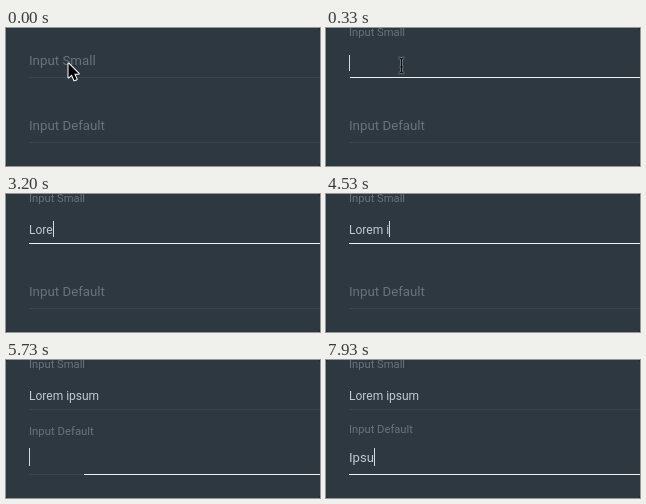
These frames come from a looping animation (314 px wide and 138 px high, 8000 ms). An HTML page with a canvas:

```html
<!DOCTYPE html>
<html lang="en">
<head>
<meta charset="utf-8">
<title>Floating label inputs</title>
<style>
html, body { margin: 0; width: 100%; height: 100%; overflow: hidden; background: #1d262b; }
canvas { display: block; border-radius: 3px; }
</style>
</head>
<body>
<canvas id="stage" width="314" height="138"></canvas>
<script>
const ctx = document.getElementById('stage').getContext('2d');
const LOOP = 8000, LEFT = 23, RIGHT = 314;
const LINE_CENTER = 794; // the fields run far past the right edge
const FLOAT_MS = 250;
const COLOR = { bg: '#2d3840', label: '#69737a', text: '#c3c9cd', idle: '#3a454c', active: '#eef1f2', caret: '#d5dadd' };

const fields = [
  {
    label: 'Input Small', labelY: 37, lineY: 49, size: 12, textY: 40, caretY: 27, caretH: 16,
    focus: 90, blur: 5560, value: 'Lorem ipsum',
    keys: [2330, 2670, 3000, 3200, 3800, 3930, 4530, 4730, 4930, 5070, 5200],
    blinks: [130, 800, 1330, 1800, 2270, 3730, 3800, 4470, 4530, 5600]
  },
  {
    label: 'Input Default', labelY: 102, lineY: 114, size: 13.1, textY: 102, caretY: 88, caretH: 18,
    focus: 5560, blur: Infinity, value: 'Ipsu',
    keys: [7330, 7530, 7800, 7930],
    blinks: [5600, 6330, 6800]
  }
];

const lerp = (a, b, p) => a + (b - a) * p;
const countPast = (times, t) => times.filter(x => x <= t).length;

// cubic-bezier(.4, 0, .2, 1), solved by bisection
function ease(x) {
  if (x <= 0) return 0;
  if (x >= 1) return 1;
  let lo = 0, hi = 1;
  for (let i = 0; i < 24; i++) {
    const u = (lo + hi) / 2, v = 1 - u;
    if (1.2 * v * v * u + 0.6 * v * u * u + u * u * u < x) lo = u; else hi = u;
  }
  return lo * lo * (3 - 2 * lo);
}

// Motion advances at 15 steps per second.
function snap(t) {
  const rest = t % 200;
  return t - rest + (rest >= 130 ? 130 : rest >= 70 ? 70 : 0);
}

function text(str, x, y, size, color) {
  ctx.font = `${size}px Roboto, sans-serif`;
  ctx.fillStyle = color;
  ctx.fillText(str, x, y);
}

function rect(x, y, w, h, color) {
  ctx.fillStyle = color;
  ctx.fillRect(x, y, w, h);
}

function drawField(f, t) {
  const step = snap(t);
  const raise = ease((step - f.focus) / FLOAT_MS);
  const grow = raise - ease((step - f.blur) / FLOAT_MS);

  rect(LEFT, f.lineY, RIGHT - LEFT, 1, COLOR.idle);
  if (grow > 0) {
    const x = Math.round(lerp(LINE_CENTER, LEFT, grow));
    if (x < RIGHT) rect(x, f.lineY, RIGHT - x, 1, COLOR.active);
  }

  text(f.label, LEFT, lerp(f.labelY, f.labelY - 29, raise), lerp(13.3, 11.2, raise), COLOR.label);

  const typed = f.value.slice(0, countPast(f.keys, t));
  text(typed, LEFT, f.textY, f.size, COLOR.text);
  if (countPast(f.blinks, t) % 2) {
    rect(Math.round(LEFT + ctx.measureText(typed).width), f.caretY, 1, f.caretH, COLOR.caret);
  }
}

function outlined(path, width) {
  ctx.lineJoin = 'round';
  ctx.lineWidth = width;
  ctx.strokeStyle = '#fff';
  ctx.stroke(path);
}

const arrow = new Path2D('M0 0V14L3.3 11L5.8 16.8L8.2 15.8L5.7 10.2H10.2Z');
const beam = new Path2D('M-3 -7.5H-1.5L0 -6.5L1.5 -7.5H3M0 -6.5V6.5M-3 7.5H-1.5L0 6.5L1.5 7.5H3M-2 1.5H2');

function drawPointer(t) {
  if (t >= 2400) return;
  ctx.save();
  if (t < 200) {
    const p = snap(t) / 200;
    ctx.translate(lerp(62.5, 74, p), lerp(35.5, 41, p));
    outlined(arrow, 2);
    ctx.fillStyle = '#000';
    ctx.fill(arrow);
  } else {
    ctx.translate(t < 470 ? 75.5 : 76.5, 37.5);
    ctx.globalAlpha = 0.45;
    outlined(beam, 2.6);
    ctx.globalAlpha = 1;
    ctx.lineWidth = 1.2;
    ctx.strokeStyle = '#0b0e10';
    ctx.stroke(beam);
  }
  ctx.restore();
}

const start = performance.now();
function frame() {
  const t = (performance.now() - start) % LOOP;
  rect(0, 0, RIGHT, 138, COLOR.bg);
  fields.forEach(f => drawField(f, t));
  drawPointer(t);
  requestAnimationFrame(frame);
}
frame();
</script>
</body>
</html>
```
